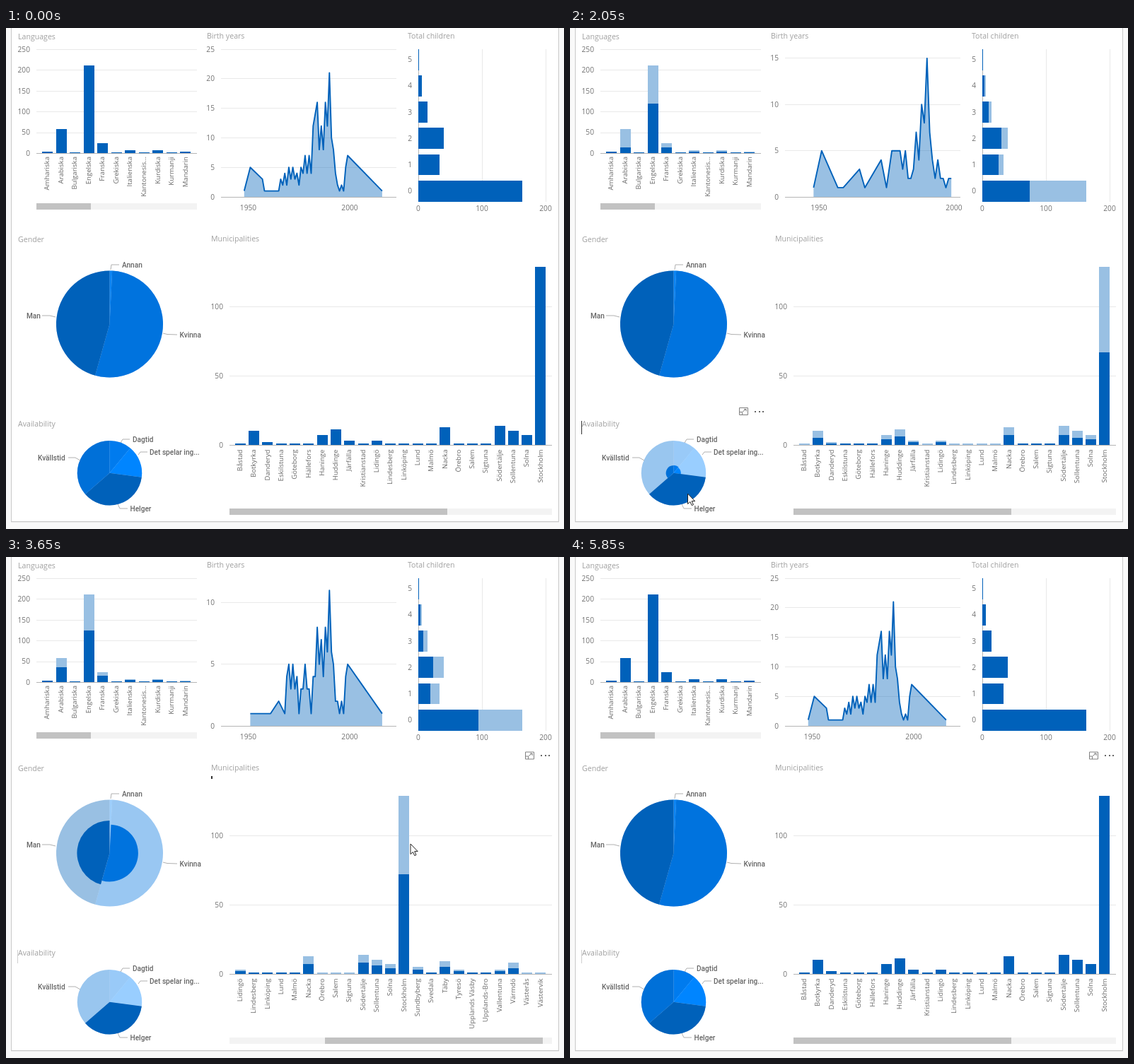
These frames come from a looping animation (789x709 px, 6.45 s). An HTML page:

```html
<!DOCTYPE html>
<html lang="sv">
<head>
<meta charset="utf-8">
<title>Dashboard</title>
<style>
  html, body { margin: 0; width: 100%; height: 100%; overflow: hidden; background: #f9f9f9; }
  svg { display: block; position: absolute; left: 0; top: 0; }
  rect, line { shape-rendering: crispEdges; }
  text { font-family: "Open Sans", "Noto Sans", sans-serif; fill: #737373; }
  .title { font-size: 10.6px; fill: #a0a0a0; }
  .num { font-size: 10.2px; }
  .cat { font-size: 9.6px; fill: #686868; }
  .pie { font: 500 10.1px Roboto, "Open Sans", sans-serif; fill: #666; }
  .mid { text-anchor: middle; }
  .end { text-anchor: end; }
  .grid { stroke: #e9e9e9; }
  .axis { stroke: #b5b5b5; }
  .lead { stroke: #b0b0b0; fill: none; }
</style>
</head>
<body>
<svg id="stage" width="789" height="709" viewBox="0 0 789 709"></svg>
<script>
const LOOP = 6450;
const DARK = '#0061ba', LIGHT = '#99c0e3';
const stage = document.getElementById('stage');

function set(el, attrs) {
  for (const k in attrs) el.setAttribute(k, attrs[k]);
}
function add(parent, tag, attrs = {}, text) {
  const el = document.createElementNS('http://www.w3.org/2000/svg', tag);
  set(el, attrs);
  if (text !== undefined) el.textContent = text;
  parent.append(el);
  return el;
}
const group = () => add(stage, 'g');
const rect = (p, x, y, width, height, fill) => add(p, 'rect', { x, y, width, height, fill });
const line = (p, x1, y1, x2, y2, cls) => add(p, 'line', { x1, y1, x2, y2, class: cls });
const label = (p, x, y, cls, text) => add(p, 'text', { x, y, class: cls }, text);
const upright = (x, y, text) =>
  add(stage, 'text', { class: 'cat end', transform: `translate(${x} ${y}) rotate(-90)` }, text);
const show = (el, on) => el.setAttribute('display', on ? 'inline' : 'none');

const clamp = x => Math.min(1, Math.max(0, x));
const mix = (a, b, p) => a + (b - a) * p;
const ease = x => x < .5 ? 4 * x ** 3 : 1 - 4 * (1 - x) ** 3;
const smooth = x => x * x * (3 - 2 * x);

// keys: [start, values, duration]; each key is eased into from the one before
function tween(keys, t) {
  let i = keys.length - 1;
  while (i > 0 && t < keys[i][0]) i--;
  const [start, to, dur = 250] = keys[i];
  if (!i || !dur) return to;
  const p = ease(clamp((t - start) / dur));
  return to.map((v, n) => mix(keys[i - 1][1][n], v, p));
}
function along(keys, t) {
  let i = 0;
  while (i < keys.length - 2 && t >= keys[i + 1][0]) i++;
  const [a, b] = [keys[i], keys[i + 1]], p = smooth(clamp((t - a[0]) / (b[0] - a[0])));
  return [mix(a[1], b[1], p), mix(a[2], b[2], p)];
}

// Times at which the other charts answer a click
const KVINNA = 1050, HELGER = 2150, STHLM = 4200, RESET = 5500;

// share: highlighted part of the counts; kids: share at 0, share at 1, change per child
// curve: [year, births] turning points; the years between them zigzag from `zig` on
const views = [
  { at: 0, share: 1, arabic: 1, kids: [1, 1, 0], top: 25, unit: 8.36, zig: 64,
    curve: [[48, 1], [51, 5], [57, 3], [58, 1], [64, 1], [72, 5], [75, 2], [78, 7], [81, 4], [83, 14],
      [87, 8], [90, 21], [92, 8], [94, 2], [97, 1], [99, 7], [116, 1]] },
  { at: KVINNA, share: .56, arabic: .24, kids: [.455, .8, -.06], top: 15, unit: 13.07, zig: 80, wide: true,
    curve: [[48, 1], [51, 5], [57, 1], [59, 1], [65, 3], [67, 1], [73, 4], [75, 1], [77, 5], [80, 5],
      [84, 2], [86, 7], [87, 4], [90, 15], [92, 4], [97, 1], [99, 2]] },
  { at: HELGER, share: .585, arabic: .62, kids: [.577, .58, 0], top: 10, unit: 17.45, zig: 69,
    curve: [[51, 1], [61, 1], [65, 2], [68, 1], [69, 4], [74, 4], [75, 1], [78, 5], [81, 1], [84, 8],
      [87, 4], [90, 11], [92, 5], [94, 2], [97, 1], [99, 5], [116, 1]] },
  { at: STHLM, share: .54, arabic: .29, kids: [.577, .52, -.11], top: 10, unit: 17.45, zig: 76,
    curve: [[51, 2], [57, 1], [72, 1], [74, 3], [76, 1], [77, 5], [81, 3], [83, 7], [87, 3], [88, 11],
      [90, 10], [92, 5], [94, 2], [98, 4], [99, 2], [116, 1]] }
];
const keysOf = values => [...views, { ...views[0], at: RESET }].map(v => [v.at, values(v)]);

/* card and titles */
rect(stage, 0, 0, 789, 709, '#f9f9f9');
rect(stage, 7, -5, 775, 705, '#ebebeb');
add(stage, 'rect', { x: 7.5, y: -5, width: 773.5, height: 703.5, fill: '#fff', stroke: '#c8c8c8' });
for (const [x, y, s] of [[17, 15.5, 'Languages'], [284, 15, 'Birth years'], [568, 15, 'Total children'],
  [17, 302.5, 'Gender'], [290, 302, 'Municipalities'], [17, 564, 'Availability']]) label(stage, x, y, 'title', s);

// A column pair: full height in the light tone, highlighted part on top
const columns = (count, x, step, width) => Array.from({ length: count }, (_, i) =>
  [LIGHT, DARK].map(c => rect(stage, x + i * step, 0, width, 0, c)));
function grow(bar, base, value, scale) {
  const height = value > .5 ? Math.max(1, value * scale) : 0;
  set(bar, { y: base - height, height });
}
function levels(max, left, right, base, scale, numX) {
  for (let v = 0; v <= max; v += 50) {
    const y = base - v * scale;
    if (v) line(stage, left, y + .5, right, y + .5, 'grid');
    label(stage, numX, y + 3.7, 'num end', v);
  }
}

/* languages */
const langs = ['Amhariska', 'Arabiska', 'Bulgariska', 'Engelska', 'Franska', 'Grekiska', 'Italienska',
  'Kantonesis...', 'Kurdiska', 'Kurmanji', 'Mandarin'];
const speakers = { Amhariska: 4, Arabiska: 58, Engelska: 211, Franska: 24, Italienska: 7, Kurdiska: 7, Mandarin: 3 };
const langKeys = keysOf(v => langs.map(s =>
  Math.ceil((speakers[s] || 1) * (s === 'Arabiska' ? v.arabic : v.share))));
levels(250, 43, 270, 177, .588, 34);
rect(stage, 43, 248, 227, 9, '#f3f3f3');
rect(stage, 43, 248, 77, 9, '#c2c2c2');
const langBars = columns(langs.length, 51, 19.5, 15.3);
line(stage, 43, 177.5, 270, 177.5, 'axis');
langs.forEach((s, i) => {
  grow(langBars[i][0], 177, speakers[s] || 1, .588);
  upright(61.3 + i * 19.53, 182, s);
});

/* birth years: even years swing up, odd years down */
function yearly({ curve, zig }) {
  const out = [];
  curve.forEach(([year, n], i) => {
    out.push([year, n]);
    const next = curve[i + 1];
    if (!next || year < zig || next[0] > 99) return;
    for (let y = year + 1; y < next[0]; y++) {
      const mid = mix(n, next[1], (y - year) / (next[0] - year));
      out.push([y, Math.max(1, Math.round(mid * (y % 2 ? .7 : 1.3)))]);
    }
  });
  return out;
}
const birthGroups = views.map(view => {
  const g = group(), x50 = view.wide ? 352 : 342.5, step = view.wide ? 3.82 : 2.87;
  const up = v => 239 - v * view.unit;
  const pts = yearly(view).map(([y, v]) => [x50 + (y - 50) * step, up(v)]);
  for (let v = 0; v <= view.top; v += 5) {
    line(g, 304, up(v), 552, up(v), v ? 'grid' : 'axis');
    label(g, 295, up(v) + 3.5, 'num end', v);
  }
  label(g, x50, 258, 'num mid', 1950);
  label(g, x50 + 50 * step, 258, 'num mid', 2000);
  const d = 'M' + pts.map(p => p.map(n => n.toFixed(1)).join(' ')).join('L');
  add(g, 'path', { d: `${d}L${pts[pts.length - 1][0]} 239L${pts[0][0]} 239Z`, fill: DARK, 'fill-opacity': .4 });
  add(g, 'path', { d, fill: 'none', stroke: DARK, 'stroke-width': 1.9, 'stroke-linejoin': 'round' });
  return g;
});

/* total children */
const families = [163, 33, 40, 14, 5, 1];
const kidsKeys = keysOf(({ kids: [none, one, slope] }) =>
  families.map((v, n) => Math.round(v * (n ? one + slope * (n - 1) : none))));
[0, 100, 200].forEach(v => {
  const x = 583 + v * .9;
  line(stage, x + .5, 30, x + .5, 246, v ? 'grid' : 'axis');
  label(stage, x, 259, 'num mid', v);
});
const kidsBars = families.map((v, n) => {
  const y = 215.7 - n * 37.2;
  label(stage, 574, y + 18.4, 'num end', n);
  rect(stage, 583, y, v * .9, 29.8, LIGHT);
  return rect(stage, 583, y, 0, 29.8, DARK);
});

/* pies: each slice has a pale full wedge and an inner wedge of changing radius */
function wedge(cx, cy, r, a, b) {
  const at = deg => {
    const k = deg * Math.PI / 180;
    return `${(cx + r * Math.sin(k)).toFixed(2)} ${(cy - r * Math.cos(k)).toFixed(2)}`;
  };
  return `M${cx} ${cy}L${at(a)}A${r} ${r} 0 ${b - a > 180 ? 1 : 0} 1 ${at(b)}Z`;
}
function pie(cx, cy, r, cuts, colors) {
  const path = (i, size) => wedge(cx, cy, r * size, cuts[i], cuts[i + 1]);
  colors.forEach((fill, i) => add(stage, 'path', { d: path(i, 1), fill, 'fill-opacity': .4 }));
  const inner = colors.map(fill => add(stage, 'path', { fill }));
  return sizes => inner.forEach((el, i) => el.setAttribute('d', sizes[i] > .005 ? path(i, sizes[i]) : ''));
}
const drawGender = pie(146.5, 419, 75.5, [0, 2.8, 195.7, 360], ['#0a84f4', '#0073de', DARK]);
const genderKeys = [
  [0, [1, 1, 1]],
  [850, [0, 1, 0], 0],
  [1900, [1, 1, 1], 0],
  [HELGER, [0, .535, .61]],
  [STHLM, [1, .49, .52]],
  [RESET, [1, 1, 1]]
];
const drawAvail = pie(146.5, 629.8, 45.7, [0, 39.6, 97.5, 229, 360], ['#007bee', '#0085ff', DARK, '#0070d8']);
const whole = [1, 1, 1, 1];
const availKeys = [
  [0, whole],
  [KVINNA, [.56, .52, .53, .55]],
  [1900, [.56, .52, 1, .55], 0],
  [1920, [0, 0, 1, 0]],
  [4000, whole, 0],
  [STHLM, [.52, .47, .5, .52]],
  [RESET, whole]
];
for (const [points, x, y, s] of [
  ['148,342 149,335 160,335', 164, 339, 'Annan'],
  ['222,432 228,433.5 242,434', 245.5, 437.7, 'Kvinna'],
  ['51,407 62,407 70,409', 29, 411, 'Man'],
  ['162,587 165,582 175,582', 179, 585.5, 'Dagtid'],
  ['187,604 190,600 200,600', 203, 603.7, 'Det spelar ing...'],
  ['88,608 98,608 105,612', 45, 612, 'Kvällstid'],
  ['158,674 161,680 172,680', 175.5, 683.5, 'Helger']
]) {
  add(stage, 'polyline', { points, class: 'lead' });
  label(stage, x, y, 'pie', s);
}

/* municipalities */
const SLOTS = 23, STEP = 19.3;
const towns = ['Båstad', 'Botkyrka', 'Danderyd', 'Eskilstuna', 'Göteborg', 'Hällefors', 'Haninge', 'Huddinge',
  'Järfälla', 'Kristianstad', 'Lidingö', 'Lindesberg', 'Linköping', 'Lund', 'Malmö', 'Nacka', 'Örebro', 'Salem',
  'Sigtuna', 'Södertälje', 'Sollentuna', 'Solna', 'Stockholm', 'Sundbyberg', 'Svedala', 'Täby', 'Tyresö',
  'Upplands Väsby', 'Upplands-Bro', 'Vallentuna', 'Värmdö', 'Västerås', 'Västervik'];
const crowds = { Botkyrka: 10, Danderyd: 2, Haninge: 7, Huddinge: 11, Järfälla: 3, Lidingö: 3, Nacka: 12.6,
  Södertälje: 14, Sollentuna: 10, Solna: 7, Stockholm: 128.4, Sundbyberg: 5, Täby: 9, Tyresö: 3,
  Vallentuna: 3, Värmdö: 8 };
const townAll = towns.map(s => crowds[s] || 1);
// A single person falls on one side or the other
const coin = n => Math.sin(n * 12.9898) * 43758.5453 % 1 > 0 ? 1 : 0;
const part = (share, side) => townAll.map((v, i) => v > 1 ? Math.round(v * share) : +(coin(i) === side));
const townKeys = [
  [0, townAll],
  [KVINNA, part(.52, 1)],
  [HELGER, part(.56, 0)],
  [4000, townAll.map((v, i) => towns[i] === 'Stockholm' ? v : 0), 0],
  [5300, townAll, 0]
];
levels(100, 316, 772, 590, 1.96, 307);
const townBars = columns(SLOTS, 323.8, STEP, 15);
line(stage, 316, 590.5, 772, 590.5, 'axis');
const townLabels = townBars.map((_, i) => upright(334 + i * STEP, 596.5, ''));
rect(stage, 316, 680, 456, 9, '#f3f3f3');
const thumb = rect(stage, 316, 680, 308, 9, '#c2c2c2');

function scrollAt(t) {
  if (t < 2850 || t >= 4000) return 0;
  return t < 2900 ? (t - 2850) * .24 : mix(12, 135, clamp((t - 2900) / 350));
}
function drawTowns(t) {
  const shift = scrollAt(t), first = Math.floor(shift / 13.45), lit = tween(townKeys, t);
  thumb.setAttribute('x', 316 + shift);
  townBars.forEach(([pale, dark], i) => {
    const n = first + i;
    grow(pale, 590, townAll[n], 1.96);
    grow(dark, 590, lit[n], 1.96);
    if (townLabels[i].textContent !== towns[n]) townLabels[i].textContent = towns[n];
  });
}

/* hover icons and text carets, each with the spans in which it shows */
function tools(x, y) {
  const g = add(stage, 'g', { transform: `translate(${x} ${y})` });
  add(g, 'path', { d: 'M.5 .5H12.5V10.5H.5ZM.5 6.5H4.5V10.5M5 6L10 2.5M7 2.5H10.2V5.5', fill: 'none', stroke: '#808080' });
  [22, 27.5, 33].forEach(dx => rect(g, dx, 4.5, 2.4, 2, '#666'));
  return g;
}
const pointer = add(stage, 'path', {
  d: 'M0 0V14.6L3.4 11.5L5.8 16.6L8 15.6L5.7 10.6H10.2Z', fill: '#fff', stroke: '#222', 'stroke-linejoin': 'round'
});
const shows = [
  [tools(239, 276), [490, 1430]],
  [tools(239, 537), [1430, 3400]],
  [tools(734, 275.5), [200, 490], [2450, LOOP]],
  [rect(stage, 16, 556, 1, 19, '#333'), [1700, 2600]],
  [rect(stage, 16, 556, 1, 19, '#d0d0d0'), [2600, LOOP]],
  [rect(stage, 290, 310, 2, 4, '#333'), [2700, 3200], [3400, 4500]],
  [rect(stage, 290, 310, 1, 4, '#d0d0d0'), [3200, 3400], [4500, 5300]],
  [pointer, [200, 5830]]
];
stage.append(pointer);

const toScroll = [[200, 480, 684], [600, 207.5, 473], [1300, 207.5, 473], [1650, 170, 664],
  [1750, 166.5, 659], [2250, 166.5, 659], [2800, 378, 684]];
const fromScroll = [[3400, 513, 683], [3650, 572, 406], [3850, 565.5, 401], [4750, 565.5, 401],
  [5250, 540, 665], [5550, 540, 665], [5820, 540, 689]];
function pointerAt(t) {
  if (t < 2850) return along(toScroll, t);
  return t < 3400 ? [378 + scrollAt(t), 683.5] : along(fromScroll, t);
}

function render(t) {
  tween(langKeys, t).forEach((v, i) => grow(langBars[i][1], 177, v, .588));
  tween(kidsKeys, t).forEach((v, i) => kidsBars[i].setAttribute('width', v * .9));
  drawGender(tween(genderKeys, t));
  drawAvail(tween(availKeys, t));
  drawTowns(t);
  const now = t < RESET ? views.filter(v => t >= v.at).length - 1 : 0;
  birthGroups.forEach((g, i) => show(g, i === now));
  for (const [el, ...spans] of shows) show(el, spans.some(([a, b]) => t >= a && t < b));
  pointer.setAttribute('transform', `translate(${pointerAt(t).join(' ')})`);
}

const begin = performance.now();
function tick() {
  render((performance.now() - begin) % LOOP);
  requestAnimationFrame(tick);
}
tick();
</script>
</body>
</html>
```
